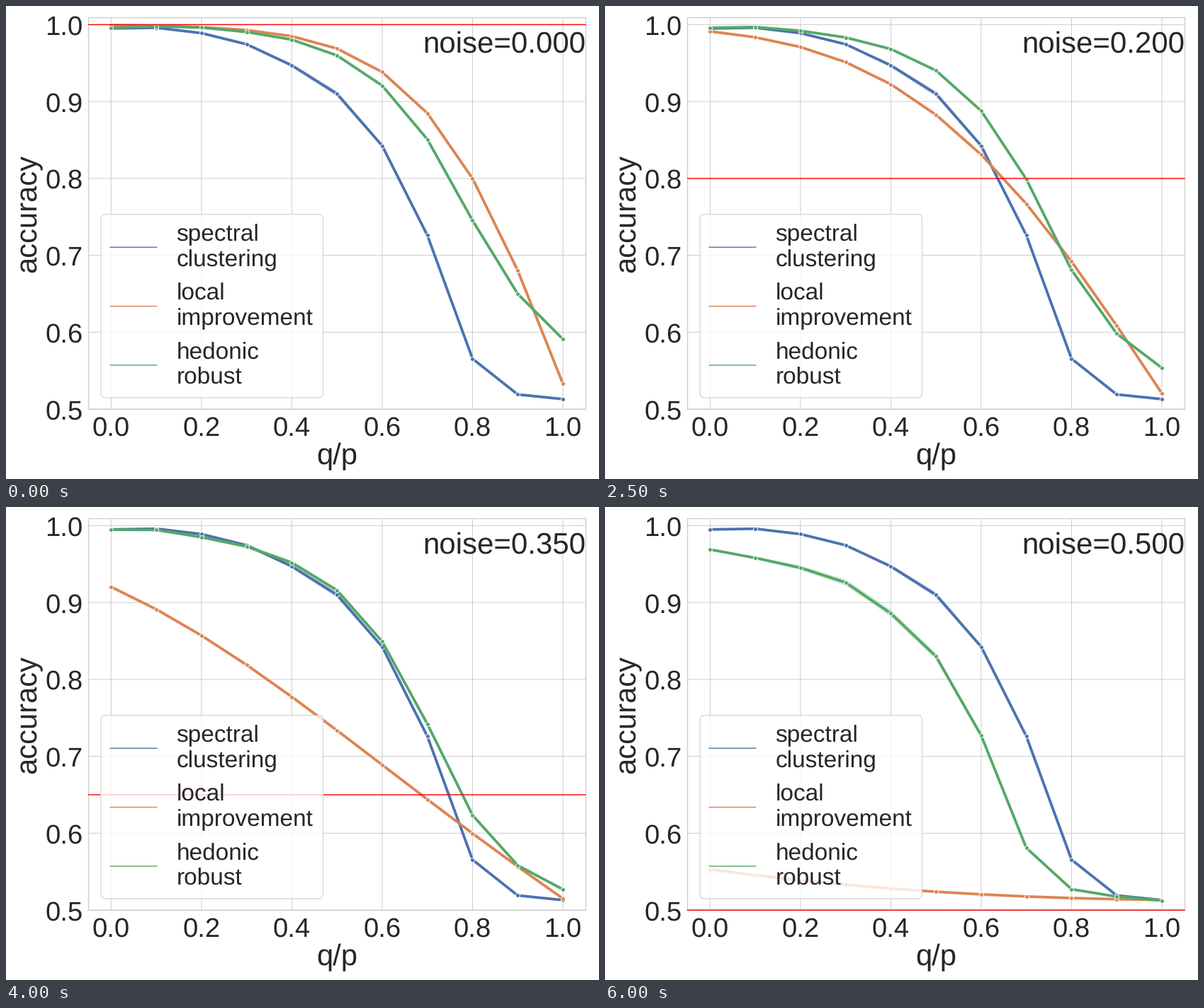
These frames come from a looping animation (837x669 px, 6.5 s). A matplotlib script:

```python
import math

import numpy as np
import matplotlib.pyplot as plt
from matplotlib.animation import FuncAnimation
from matplotlib.patches import FancyBboxPatch

W, H, DPI = 837, 669, 64
BLUE, ORANGE, GREEN = "#4c72b0", "#dd8452", "#55a868"
INK, GRAY = "#262626", "#cccccc"
LEFT, RIGHT, TOP, BOTTOM = 116.5, 817.9, 15.5, 570.1
X_LIM, Y_LIM = (-.05, 1.05), (.5, 1.01)

plt.rcParams["font.family"] = "Liberation Sans"
plt.rcParams["text.hinting"] = "none"

# Even steps of 0.05, with a half step at either end
NOISE = np.sort(np.r_[np.linspace(0, .5, 11), .025, .475])
Q = np.linspace(0, 1, 11)

erf = np.vectorize(math.erf)


def normal_cdf(z):
    return (1 + erf(z / math.sqrt(2))) / 2


def spectral(noise):
    """Independent of the noise."""
    return np.array([.995, .996, .989, .9745, .947, .910,
                     .8425, .726, .5655, .519, .513])


def local(noise):
    """Normal score that grows with the gap 1 - q, weaker as noise rises."""
    signal, gap = 1 - 2 * noise, 1 - Q
    levels = [0, .1, .3, .5, .7, .9, 1]
    near = np.interp(signal, levels, [.02, .24, 1.03, 1.84, 2.64, 3.47, 3.9])
    far = np.interp(signal, levels, [.1, .48, 1.37, 2.05, 2.6, 3.02, 3.1])
    slope = near + (far - near) * gap ** 1.25
    return normal_cdf(.033 + .05 * signal ** 2 + slope * gap)


def robust(noise):
    """Normal score easing from a clean profile to a fully noisy one."""
    clean = np.array([2.65, 2.87, 2.67, 2.345, 2.064, 1.75, 1.41, 1.04, .66, .385, .23])
    noisy = np.array([1.866, 1.728, 1.6, 1.447, 1.205, .954, .604, .204, .068, .044, .031])
    u = 2 * noise
    steady = np.interp(Q, [0, .2, .7, 1], [0, .6, .6, 1.2])
    progress = steady * u + (1 - steady) * u ** 6
    return normal_cdf(clean + (noisy - clean) * progress)


def bell(center, width):
    return np.exp(-((Q - center) / width) ** 2)


def spectral_spread(noise):
    return .0035 * bell(.5, .15)


def local_spread(noise):
    return 0 * Q


def robust_spread(noise):
    return (.001 + .0035 * np.clip((noise - .25) / .2, 0, 1)) * bell(.4, .3)


def pt(px):
    return px * 72 / DPI


def x_px(q):
    return LEFT + (q - X_LIM[0]) / (X_LIM[1] - X_LIM[0]) * (RIGHT - LEFT)


def y_px(acc):
    return BOTTOM - (acc - Y_LIM[0]) / (Y_LIM[1] - Y_LIM[0]) * (BOTTOM - TOP)


def label(x, y, text, size, **kw):
    return page.text(x, y, text, fontsize=pt(size), color=INK,
                     va="baseline", **kw)


fig = plt.figure(figsize=(W / DPI, H / DPI), dpi=DPI, facecolor="white")

ax = fig.add_axes([LEFT / W, 1 - BOTTOM / H, (RIGHT - LEFT) / W, (BOTTOM - TOP) / H])
x_ticks, y_ticks = np.linspace(0, 1, 6), np.linspace(.5, 1, 6)
ax.set(xlim=X_LIM, ylim=Y_LIM, xticks=x_ticks, yticks=y_ticks)
ax.tick_params(length=0, labelbottom=False, labelleft=False)
ax.grid(color=GRAY, lw=pt(1), snap=False)
ax.set_axisbelow(True)
for spine in ax.spines.values():
    spine.set(color=GRAY, lw=pt(1.3))

page = fig.add_axes([0, 0, 1, 1], zorder=2)
page.set(xlim=(0, W), ylim=(H, 0))
page.axis("off")

# Axis labels
for q in x_ticks:
    label(x_px(q), 607.5, f"{q:.1f}", 38.3, ha="center")
for acc in y_ticks:
    label(108.5, y_px(acc) + 14.2, f"{acc:.1f}", 38.3, ha="right")
label(467, 648.5, "q/p", 41.8, ha="center")
label(42.5, 293.7, "accuracy", 41.8, ha="center", rotation=90,
      rotation_mode="anchor")
noise_text = label(818, 65.8, "", 42, ha="right")

# Legend
page.add_patch(FancyBboxPatch((134, 294.7), 313.5, 259.3,
                              boxstyle="round,pad=0,rounding_size=6.5",
                              fc=(1, 1, 1, .8), ec=(.8, .8, .8, .8), lw=pt(1.3)))
entries = [(BLUE, "spectral", "clustering"),
           (ORANGE, "local", "improvement"),
           (GREEN, "hedonic", "robust")]
for i, (color, first, second) in enumerate(entries):
    y = 341.2 + 83.4 * i
    page.plot([146.5, 213.5], [y, y], color=color, lw=pt(1.4),
              solid_capstyle="butt", snap=False)
    label(240.5, y - 8.8, first, 33.4)
    label(240.5, y + 26.7, second, 33.4)

# Data
series = []
for curve, spread, color in [(spectral, spectral_spread, BLUE),
                             (local, local_spread, ORANGE),
                             (robust, robust_spread, GREEN)]:
    band, = ax.fill([0, 0, 0], [1, 1, 1], color=color, alpha=.25, lw=0, zorder=1.5)
    line, = ax.plot(Q, Q, color=color, lw=pt(3.8), marker="o", ms=pt(6),
                    mec="white", mew=pt(.9), zorder=2)
    series.append((curve, spread, line, band))
limit = ax.axhline(1, color="red", lw=pt(1.4), zorder=2.6, snap=False,
                   clip_on=False)


def draw(frame):
    noise = NOISE[frame]
    for curve, spread, line, band in series:
        acc, half = curve(noise), spread(noise)
        line.set_ydata(acc)
        band.set_xy(np.column_stack([np.r_[Q, Q[::-1]],
                                     np.r_[acc + half, (acc - half)[::-1]]]))
    limit.set_ydata([1 - noise] * 2)
    noise_text.set_text(f"noise={noise:.3f}")
    return []


anim = FuncAnimation(fig, draw, frames=len(NOISE), interval=500,
                     repeat=True, repeat_delay=0)
plt.show()
```
